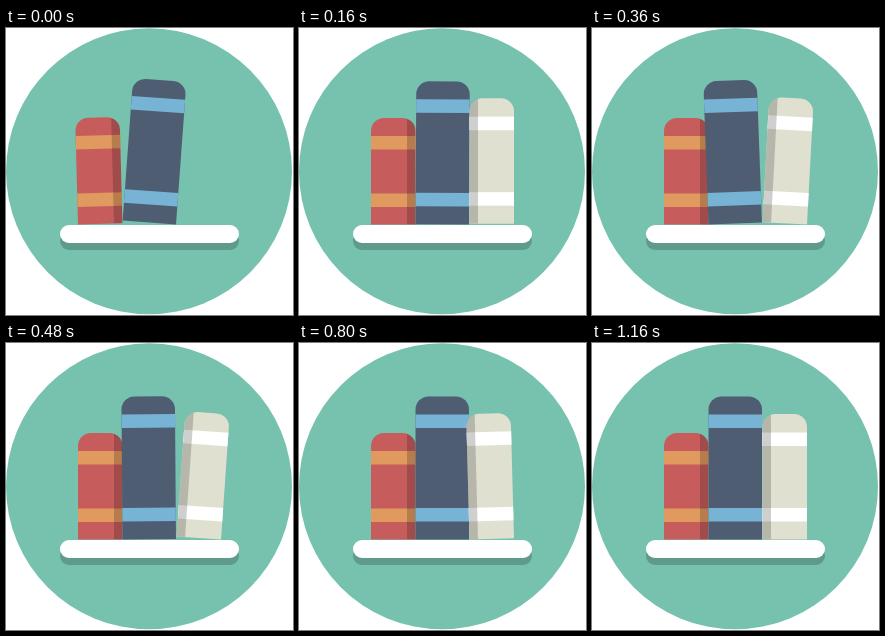
An HTML page with a canvas that plays this animation: 287x287 px, repeating every 1.2 s.

```html
<!DOCTYPE html>
<html lang="en">
<head>
<meta charset="utf-8">
<title>Books on a shelf</title>
<style>
  html, body { margin: 0; width: 100%; height: 100%; overflow: hidden; background: #fff; }
  canvas { display: block; width: 287px; height: 287px; }
</style>
</head>
<body>
<canvas id="stage"></canvas>
<script>
const SIZE = 287, LOOP = 1200, FLOOR = 196.5;
const SHADE = 'rgba(0,0,0,0.19)';
const canvas = document.getElementById('stage');
const ctx = canvas.getContext('2d');
const ratio = window.devicePixelRatio || 1;
canvas.width = canvas.height = Math.round(SIZE * ratio);

// Every book runs the same drop and wobble; lead is its head start in ms.
const books = [
  { x: 72, w: 44.5, top: 90, color: '#c75c5c', band: '#e0995e', bands: [108, 165.5], shade: 108, lead: 800 },
  { x: 116.5, w: 53.5, top: 53.5, color: '#4f5d73', band: '#77b3d4', bands: [71.5, 165], lead: 400 },
  { x: 170.5, w: 44.5, top: 71, color: '#e0e0d1', band: '#fff', bands: [89.5, 165], shade: 170.5, lead: 0 }
];

// Time in ms and tilt in degrees, eased in and out between stops.
const wobble = [[240, 0], [440, 4.6], [660, -2.8], [960, 0]];

function tilt(t) {
  for (let i = 1; i < wobble.length; i++) {
    const [t0, a] = wobble[i - 1], [t1, b] = wobble[i];
    if (t >= t0 && t < t1) {
      return a + (b - a) * (1 - Math.cos(Math.PI * (t - t0) / (t1 - t0))) / 2;
    }
  }
  return 0;
}

function drop(t) {
  const left = Math.max(0, 1 - t / 172);
  return -200 * left * left;
}

function fillRound(x, y, w, h, r, color) {
  ctx.beginPath();
  ctx.roundRect(x, y, w, h, r);
  ctx.fillStyle = color;
  ctx.fill();
}

function drawBook(book, time) {
  const { x, w, top } = book;
  const t = time + book.lead;
  const angle = tilt(t);
  const pivot = angle > 0 ? x + w : x;
  ctx.save();
  ctx.translate(pivot, FLOOR + drop(t));
  ctx.rotate(angle * Math.PI / 180);
  ctx.translate(-pivot, -FLOOR);
  fillRound(x, top, w, FLOOR - top, [13, 13, 0, 0], book.color);
  ctx.fillStyle = book.band;
  for (const y of book.bands) ctx.fillRect(x, y, w, 13.5);
  if (book.shade) {
    const corners = book.shade === x ? [13, 0, 0, 0] : [0, 13, 0, 0];
    ctx.beginPath();
    ctx.roundRect(x, top, w, FLOOR - top, [13, 13, 0, 0]);
    ctx.clip();
    ctx.fillStyle = SHADE;
    ctx.fillRect(book.shade, top, 8.5, FLOOR - top);
  }
  ctx.restore();
}

function draw(time) {
  ctx.setTransform(ratio, 0, 0, ratio, 0, 0);
  ctx.fillStyle = '#fff';
  ctx.fillRect(0, 0, SIZE, SIZE);
  ctx.beginPath();
  ctx.arc(143, 143.3, 143, 0, Math.PI * 2);
  ctx.fillStyle = '#76c2af';
  ctx.fill();
  fillRound(54, 204, 179, 18, 9, '#5e9b8c');
  for (const book of books) drawBook(book, time);
  fillRound(54, 197, 179, 18, 9, '#fff');
}

const start = performance.now();
function tick() {
  draw((performance.now() - start) % LOOP);
  requestAnimationFrame(tick);
}
tick();
</script>
</body>
</html>
```
